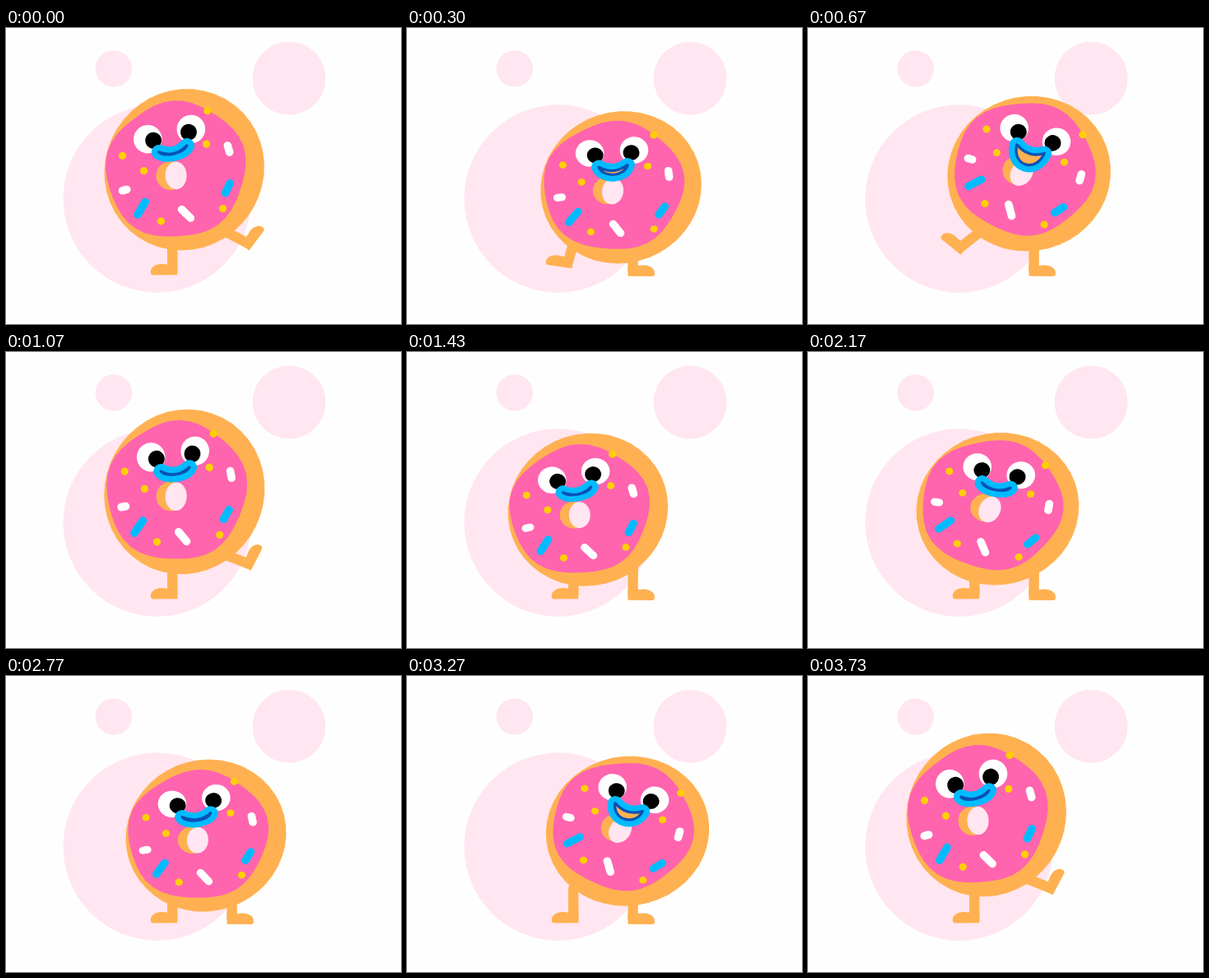
These frames come from a looping animation (480 px wide and 360 px high, 3760 ms). An HTML page:

```html
<!DOCTYPE html>
<html lang="en">
<head>
<meta charset="utf-8">
<title>Dancing donut</title>
<style>
  html, body { margin: 0; width: 100%; height: 100%; overflow: hidden; background: #fefefe; }
  svg { display: block; width: 480px; height: 360px; }
  .blush { fill: #ffe6f0; }
  .dough { fill: #ffb151; }
  .icing { fill: #ff64ae; }
  .leg { stroke: #ffb151; stroke-width: 12.4; stroke-linecap: round; }
  .lips { fill: #00bbff; stroke: #00bbff; stroke-width: 18; stroke-linejoin: round; }
  .mouth { fill: #ffb151; stroke: #0a52b5; stroke-width: 3.4; stroke-linejoin: round; }
  .sprinkle { stroke-linecap: round; stroke-width: 9.6; }
</style>
</head>
<body>
<svg viewBox="0 0 480 360">
  <defs><path id="foot" d="M-6 6.7V-6H9C20 -8 28 -2 26.3 5Q26 7 23 7Z"/></defs>
  <g class="blush">
    <circle cx="130.8" cy="49.5" r="22.2"/>
    <circle cx="344" cy="61.2" r="44.4"/>
    <circle cx="183.7" cy="207.5" r="114.2"/>
  </g>
  <g class="dough" id="legL" transform="translate(476.8 -1.5) scale(-1 1)"><line class="leg"/><use href="#foot"/></g>
  <g class="dough" id="legR"><line class="leg"/><use href="#foot"/></g>
  <path class="dough" id="ring"/>
  <g id="top">
    <path class="icing" id="icing" transform="translate(-7.5 -5)"/>
    <circle class="dough" cx="-16.3" cy="-1.8" r="17.6"/>
    <ellipse class="blush" cx="-10.4" cy="1" rx="13" ry="17" transform="rotate(26 -10.4 1)"/>
    <g id="sprinkles"></g>
    <g id="face">
      <g fill="#fff"><circle cx="-27" r="17.3"/><circle cx="27" r="17.3"/></g>
      <circle cx="-20.7" cy="3" r="10"/><circle cx="23.3" cy="3" r="10"/>
      <path class="lips" id="lips"/>
      <path class="mouth" id="mouth"/>
    </g>
  </g>
</svg>
<script>
const LOOP = 3760, STEPS = 113, BEATS = 3, TURN = 2 * Math.PI;
const $ = id => document.getElementById(id);
const mix = (a, b, t) => a + (b - a) * t;
const clamp = v => Math.min(1, Math.max(0, v));

// Swing between -1 and 1, rising through 0 at `start`; larger `snap` holds the ends longer.
const swing = (p, start, snap) => Math.tanh(snap * Math.sin(TURN * (p - start))) / Math.tanh(snap);

// Cut-paper outline: straight facets around a slightly wavy circle.
function blob(radius) {
  const pts = [];
  for (let a = 0; a < TURN; a += TURN / 45) {
    pts.push((radius(a) * Math.cos(a)).toFixed(2) + ' ' + (radius(a) * Math.sin(a)).toFixed(2));
  }
  return 'M' + pts.join('L') + 'Z';
}
$('ring').setAttribute('d', blob(a => 98 + 2 * Math.cos(2 * (a + .52))));
$('icing').setAttribute('d', blob(a => 84 + 1.5 * Math.cos(2 * a) + 1.9 * Math.cos(5 * (a + 1.117))));

const dots = [[-56.5, -50.8], [60.5, -51.1], [-42.2, -22.3], [40.4, -15.6], [-52.6, 42], [21, 63.6]];
const bars = [ // colour, x, y, angle, length
  ['#fff', -74, -12.4, 13, 5.5], ['#fff', 61.3, 2.2, 102, 8.5], ['#fff', -21.5, 48.3, 72, 15],
  ['#00bbff', -66.3, 16.9, -32, 18], ['#00bbff', 37.8, 44.2, -37, 13]
];
$('sprinkles').innerHTML =
  dots.map(([x, y]) => `<circle cx="${x}" cy="${y}" r="4.6" fill="#ffd000"/>`).join('') +
  bars.map(([c, x, y, a, l]) => `<path class="sprinkle" stroke="${c}" d="M${-l / 2} 0H${l / 2}"
    transform="translate(${x} ${y}) rotate(${a})"/>`).join('');

// Kick: the ankle swings out and up while the toe turns upwards.
function drawLeg(id, p) {
  const t = clamp((p - Math.floor(p) - .23) / .36), lift = Math.sin(Math.PI * t) ** .6;
  const x = 274.5 + 20 * Math.sin(lift * Math.PI / 2), y = mix(295, 254, lift);
  const [line, foot] = $(id).children;
  const ends = { x1: mix(274.7, 265, lift), y1: mix(260, 245, lift), x2: x, y2: y };
  for (const key in ends) line.setAttribute(key, ends[key]);
  foot.setAttribute('transform', `translate(${x} ${y}) rotate(${-72 * lift ** 1.4})`);
}

function draw(ms) {
  const p = Math.floor(ms % LOOP / LOOP * STEPS) / STEPS * BEATS;
  const side = swing(p, .203, 3.6), lean = swing(p, .28, 1.7);
  const hop = p - .44 - .015 * side;            // two hops per beat
  const base = 276.7 - 9.5 * Math.cos(2 * TURN * hop) + 1.5 * side;
  const height = 190.9 + 8 * Math.cos(2 * TURN * (hop + .03)) - 1.7 * side;
  const x = 242.7 + 26 * side, y = base - height / 2, tilt = -12.2 + 15.8 * lean;
  const pose = (px, py) => `translate(${px} ${py}) scale(1 ${height / 196}) rotate(${tilt})`;

  $('ring').setAttribute('transform', pose(x, y));
  $('top').setAttribute('transform', pose(x + 1.45 * lean, y - 1.25 * lean));
  $('face').setAttribute('transform', `translate(${4.75 - 1.5 * lean} -47.4) rotate(14.7)`);

  const open = clamp(1.3 * Math.sin(TURN * (p - .195)));
  const low = 26.5 + 19 * open, wide = 12 + 3.5 * open;
  const smile = `M-17.5 18.5Q0 30.5 17.5 18.5C${wide} ${low} ${-wide} ${low} -17.5 18.5Z`;
  $('lips').setAttribute('d', smile);
  $('mouth').setAttribute('d', smile);

  drawLeg('legL', p);
  drawLeg('legR', p - .5);
}

const start = performance.now();
function tick() {
  draw(performance.now() - start);
  requestAnimationFrame(tick);
}
tick();
</script>
</body>
</html>
```
